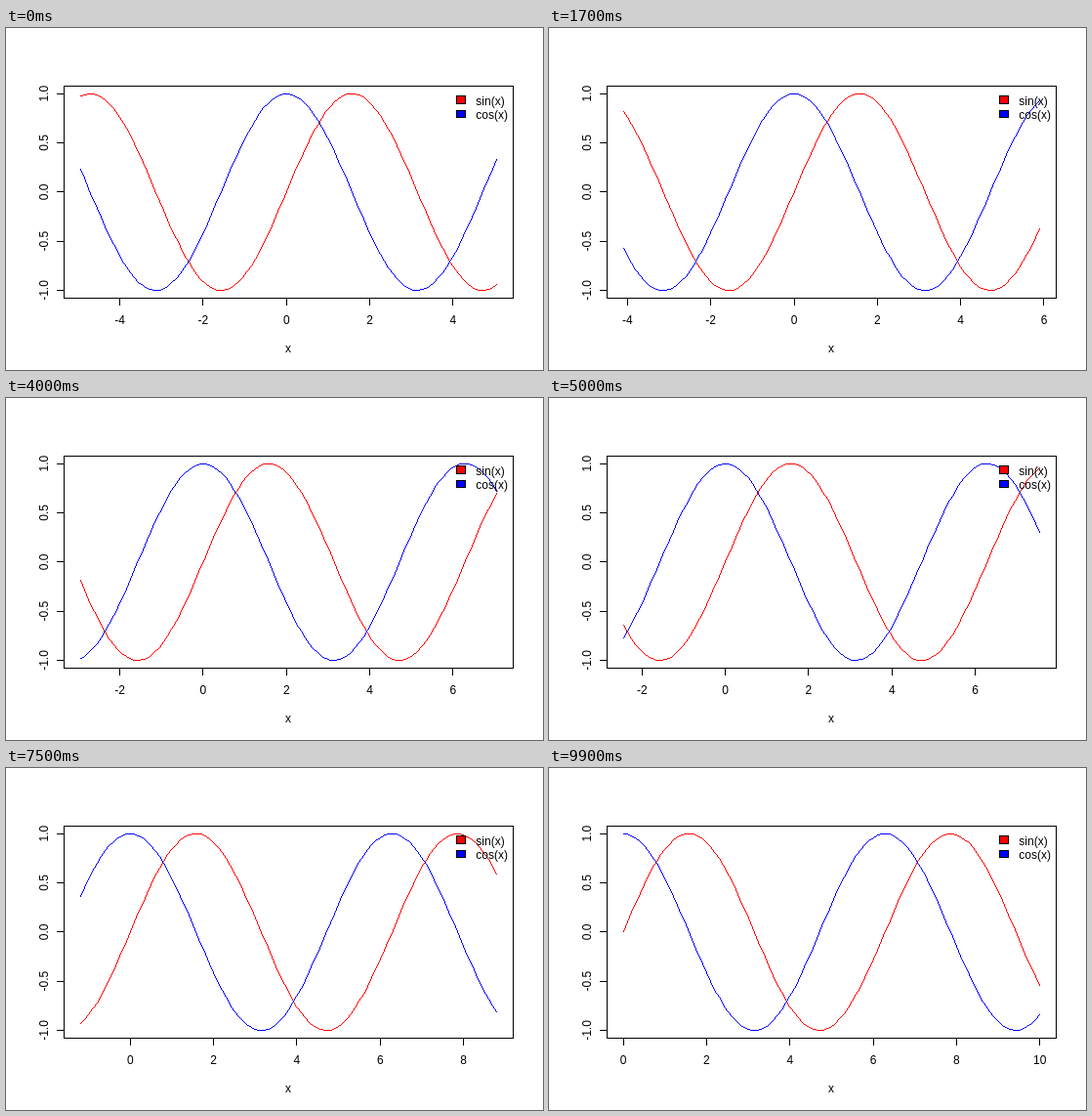
Recreate the animation shown at these times as an HTML page with a canvas. Size 550 px wide and 350 px high, loop 10 s.

```html
<!DOCTYPE html>
<html lang="en">
<head>
<meta charset="utf-8">
<title>Sliding sine and cosine</title>
<style>
html, body { margin: 0; width: 100%; height: 100%; overflow: hidden; background: #fff; }
canvas { display: block; }
</style>
</head>
<body>
<canvas id="plot" width="550" height="350"></canvas>
<script>
const ctx = document.getElementById('plot').getContext('2d');
const LEFT = 59.04, RIGHT = 519.76, TOP = 59.04, BOTTOM = 276.56;
const FRAMES = 100, FRAME_MS = 100, SPAN = 10;
const scaleX = (RIGHT - LEFT) / (SPAN * 1.08);
const scaleY = (BOTTOM - TOP) / 2.16;
const midY = (TOP + BOTTOM) / 2;
const toY = v => midY - v * scaleY;

function rect(x0, y0, x1, y1, color) {
  ctx.fillStyle = color;
  ctx.fillRect(x0, y0, x1 - x0 + 1, y1 - y0 + 1);
}

function box(x0, y0, x1, y1, fill) {
  rect(x0, y0, x1, y1, '#000');
  rect(x0 + 1, y0 + 1, x1 - 1, y1 - 1, fill);
}

function label(text, x, y, align = 'center') {
  ctx.fillStyle = '#000';
  ctx.textAlign = align;
  ctx.fillText(text, x, y);
}

// Hard-edged line between whole pixels
function line(x0, y0, x1, y1) {
  const steps = Math.max(Math.abs(x1 - x0), Math.abs(y1 - y0), 1);
  for (let i = 0; i <= steps; i++) {
    const k = i / steps;
    ctx.fillRect(Math.round(x0 + (x1 - x0) * k), Math.round(y0 + (y1 - y0) * k), 1, 1);
  }
}

function curve(fn, start, toX, color) {
  ctx.fillStyle = color;
  let px, py;
  for (let i = 0; i <= 100; i++) {
    const v = start + i * SPAN / 100;
    const x = Math.floor(toX(v) + 1e-6), y = Math.floor(toY(fn(v)));
    if (i) line(px, py, x, y);
    px = x;
    py = y;
  }
}

function axes(start, toX) {
  const margin = SPAN * 0.04 + 1e-6;
  const first = Math.ceil((start - margin) / 2) * 2;
  for (let v = first; v <= start + SPAN + margin; v += 2) {
    const x = Math.floor(toX(v) + 1e-6);
    rect(x, 276, x, 283, '#000');
    label(String(v + 0), toX(v), 303);
  }
  for (let v = -1; v <= 1; v += 0.5) {
    const y = Math.floor(toY(v));
    rect(52, y, 59, y, '#000');
    ctx.save();
    ctx.translate(43, toY(v));
    ctx.rotate(-Math.PI / 2);
    label(v.toFixed(1), 0, 0);
    ctx.restore();
  }
  label('x', 289, 332);
}

function legend() {
  box(461, 69, 470, 77, '#f00');
  box(461, 84, 470, 91, '#00f');
  label('sin(x)', 481.3, 79, 'left');
  label('cos(x)', 481.3, 93, 'left');
}

function draw(now) {
  const step = Math.floor(now / FRAME_MS) % FRAMES;
  const start = (step - FRAMES + 1) / 20;
  const toX = v => LEFT + (v - start + SPAN * 0.04) * scaleX;
  ctx.font = '12px "Liberation Sans", Arial, sans-serif';
  rect(0, 0, 549, 349, '#fff');
  box(59, 59, 519, 276, '#fff');
  axes(start, toX);
  curve(Math.sin, start, toX, '#f00');
  curve(Math.cos, start, toX, '#00f');
  legend();
}

const began = performance.now();
function tick() {
  draw(performance.now() - began);
  requestAnimationFrame(tick);
}
tick();
</script>
</body>
</html>
```
